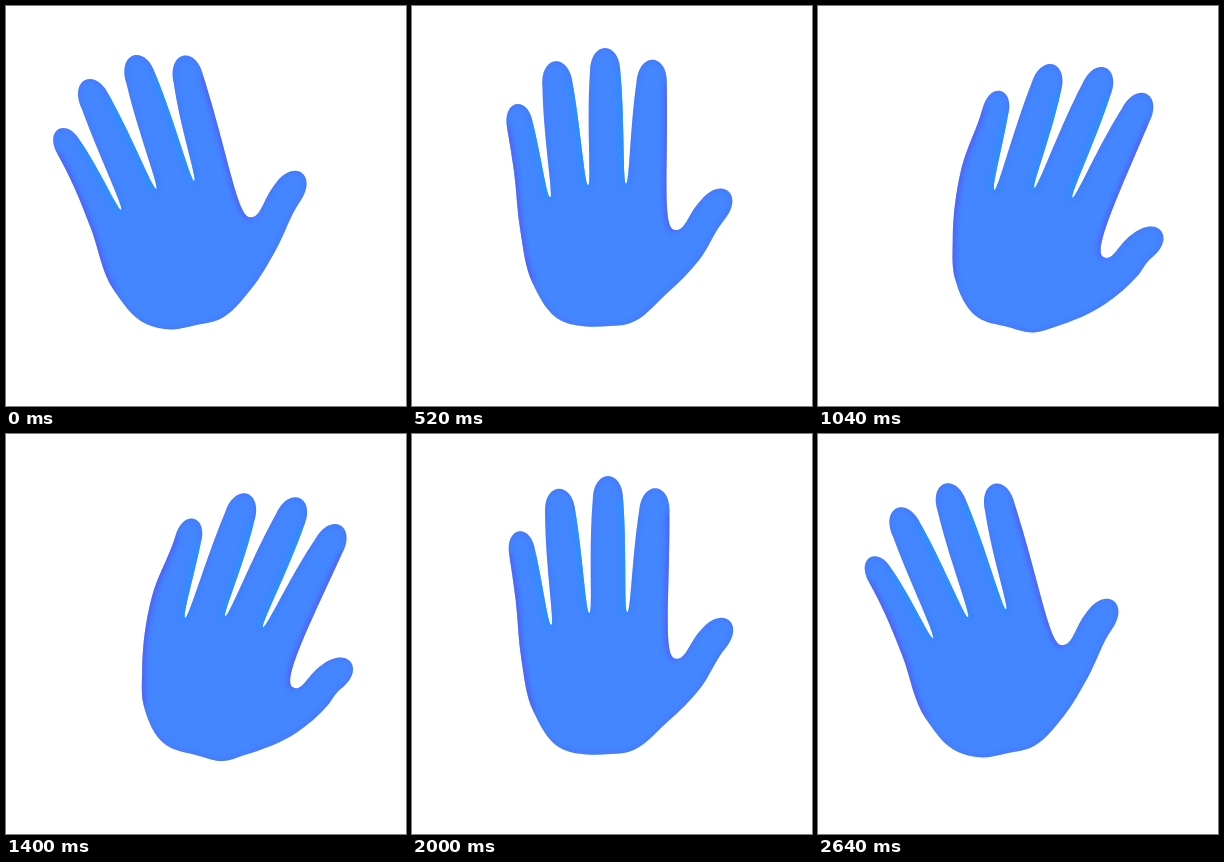
These frames come from a looping animation (400x400 px, 2.68 s). An HTML page:

```html
<!DOCTYPE html>
<html lang="en">
<head>
<meta charset="utf-8">
<title>Waving hand</title>
<style>
  html, body { margin: 0; width: 100%; height: 100%; overflow: hidden; background: #fff; }
  svg { display: block; width: 100%; height: 100%; }
</style>
</head>
<body>
<svg viewBox="0 0 400 400">
  <defs>
    <clipPath id="inside"><path id="mask"/></clipPath>
    <filter id="soft" filterUnits="userSpaceOnUse" x="0" y="0" width="400" height="400">
      <feGaussianBlur stdDeviation="2.4"/>
    </filter>
  </defs>
  <path id="hand" fill="#4486ff"/>
  <g clip-path="url(#inside)" fill="none">
    <path id="rim" stroke="#4a68fa" stroke-width="4" opacity=".5" filter="url(#soft)"/>
    <path id="violet" stroke="#5a4cf2" stroke-width="5" opacity=".6" filter="url(#soft)"/>
    <path id="cyan" stroke="#2299ff" stroke-width="8" opacity=".75" filter="url(#soft)"/>
  </g>
</svg>
<script>
const LOOP = 2680, HALF = LOOP / 2, LEAD = 73, STEP = 40;
const REACH = 1.05, MID = 0.43, EASE = 1.8;
const FULL = 1.05, DROP = 0.7, TAPER = 0.08;

// Each row holds three poses: leaning left, upright, leaning right.
const fingers = [
  { r: 12.5, x: [58, 108, 180.5], y: [134.5, 110, 97], a: [-30, -9, 15] },
  { r: 14.5, x: [84.5, 146.5, 232], y: [87.5, 69.5, 72.5], a: [-25, -5, 17] },
  { r: 14.5, x: [131, 195, 283], y: [63.5, 56.5, 75.5], a: [-18, 0, 23] },
  { r: 14.5, x: [179.5, 242, 323], y: [64, 68.5, 101.5], a: [-13, 4, 28] },
  { r: 14.5, x: [287, 307.5, 332], y: [178.5, 197, 234.5], a: [35, 40, 52] }
];
const webs = [
  { h: 3.5, x: [115, 139, 177], y: [204, 191, 184], a: [-27, -7, 16] },
  { h: 3.5, x: [150, 177, 217], y: [183, 179, 182], a: [-21, -2, 20] },
  { h: 3.5, x: [188, 215, 255], y: [175, 178, 192], a: [-15, 2, 26] },
  { h: 12, x: [243, 262, 285], y: [211, 224, 251], a: [10, 20, 35] }
];
// From below the thumb, round the wrist, up to the little finger.
const palm = [
  { x: [270, 288, 320], y: [243, 254, 270] },
  { x: [245, 255, 288], y: [283, 288, 298] },
  { x: [212, 216, 237], y: [314, 318, 321] },
  { x: [190, 198, 216], y: [319, 320, 326.5] },
  { x: [165, 175, 190], y: [323.5, 320.5, 321] },
  { x: [140, 150, 160], y: [318, 315, 311.5] },
  { x: [108, 121, 137], y: [285, 277, 272] },
  { x: [84, 109, 135], y: [221, 225, 235] },
  { x: [67, 103, 144], y: [180, 165, 162] }
];

const $ = id => document.getElementById(id);
const add = (p, d, k) => ({ x: p.x + d.x * k, y: p.y + d.y * k });
const gap = (p, q) => Math.hypot(q.x - p.x, q.y - p.y);
const pt = p => p.x.toFixed(2) + ' ' + p.y.toFixed(2);
const move = p => 'M' + pt(p);
const curve = (a, b, c) => 'C' + [a, b, c].map(pt).join(' ');

// Parabola through the three poses
function blend(v, s) {
  return v[0] * (s - MID) * (s - 1) / MID
       + v[1] * s * (1 - s) / (MID * (1 - MID))
       + v[2] * s * (s - MID) / (1 - MID);
}

function place(j, s) {
  const p = { x: blend(j.x, s), y: blend(j.y, s) };
  if (!j.a) return p;
  const a = blend(j.a, s) * Math.PI / 180;
  p.across = { x: Math.cos(a), y: Math.sin(a) };
  p.up = { x: Math.sin(a), y: -Math.cos(a) };
  if (j.r) {
    const mid = add(p, p.up, -j.r * DROP);
    p.r = j.r;
    p.left = add(mid, p.across, -j.r * FULL);
    p.right = add(mid, p.across, j.r * FULL);
  } else p.h = j.h;
  return p;
}

// Half ellipse over the fingertip
function tip(f) {
  const k = f.r * (1 + DROP) * 4 / 3;
  return curve(add(f.left, f.up, k), add(f.right, f.up, k), f.right);
}

function down(f, w, last) {
  const k = gap(f.right, w) * (last ? 0.55 : 0.45);
  const knee = add(add(f.right, f.up, -k), f.across, k * TAPER);
  return curve(knee, add(w, w.across, -w.h), w);
}

function rise(w, f) {
  const k = gap(w, f.left) * 0.45;
  const knee = add(add(f.left, f.up, -k), f.across, -k * TAPER);
  return curve(add(w, w.across, w.h), knee, f.left);
}

// Tangent at p, led by the nearer neighbour
function tangent(a, p, b) {
  const m = gap(a, p), n = gap(p, b);
  const x = (p.x - a.x) * n / m + (b.x - p.x) * m / n;
  const y = (p.y - a.y) * n / m + (b.y - p.y) * m / n;
  const l = Math.hypot(x, y);
  return { x: x / l, y: y / l };
}

// Smooth run of points leaving and arriving along given directions
function run(pts, first, end) {
  const n = pts.length - 1;
  const dirs = pts.map((p, i) =>
    i === 0 ? first : i === n ? end : tangent(pts[i - 1], p, pts[i + 1]));
  return pts.slice(1).map((q, i) => {
    const k = gap(pts[i], q) / 3;
    return curve(add(pts[i], dirs[i], k), add(q, dirs[i + 1], -k), q);
  });
}

function pose(t) {
  const u = (t + LEAD) % LOOP;
  const v = u < HALF ? u / HALF : 2 - u / HALF;
  const a = Math.pow(v, EASE), b = Math.pow(1 - v, EASE);
  return REACH * a / (a + b);
}

function draw(t) {
  const s = pose(t);
  const f = fingers.map(j => place(j, s));
  const w = webs.map(j => place(j, s));
  const base = palm.map(j => place(j, s));

  let d = move(f[0].left) + tip(f[0]), cyan = '';
  w.forEach((web, i) => {
    const last = i === 3;
    const fall = down(f[i], web, last);
    d += fall + rise(web, f[i + 1]) + tip(f[i + 1]);
    if (!last) cyan += move(f[i].right) + fall;
  });

  const thumb = f[4], little = f[0];
  const back = { x: -thumb.up.x, y: -thumb.up.y };
  const edge = run([thumb.right, ...base, little.left], back, little.up);
  d += edge.join('') + 'Z';

  for (const id of ['hand', 'mask', 'rim']) $(id).setAttribute('d', d);
  $('cyan').setAttribute('d', cyan);
  $('violet').setAttribute('d',
    move(base[6]) + edge.slice(7).join('') + move(f[3].right) + down(f[3], w[3], true));
}

function tick() {
  const t = performance.now() % LOOP;
  draw(Math.floor(t / STEP) * STEP);
  requestAnimationFrame(tick);
}
tick();
</script>
</body>
</html>
```
